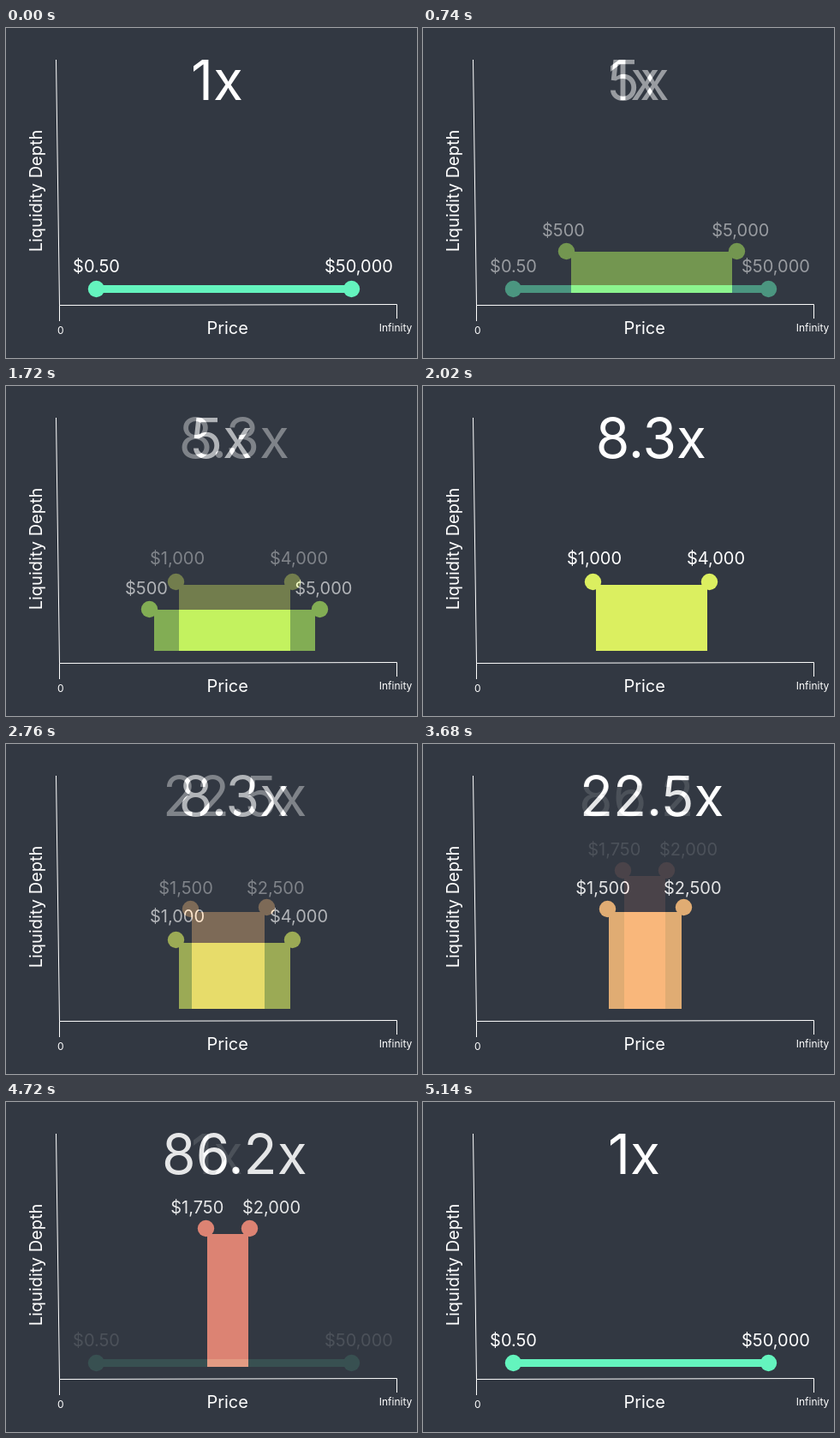
These frames come from a looping animation (480 px wide and 385 px high, 5200 ms). An HTML page:

```html
<!DOCTYPE html>
<html lang="en">
<head>
<meta charset="utf-8">
<title>Liquidity depth by price range</title>
<style>
  html, body { margin: 0; width: 100%; height: 100%; overflow: hidden; background: #323842; }
  svg { display: block; width: 480px; height: 385px; }
  text {
    font-family: Inter, Roboto, sans-serif;
    font-size: 20px;
    font-optical-sizing: none;
    text-anchor: middle;
    fill: #fff;
  }
  .small { font-size: 12px; }
  .big { font-size: 64px; }
  .axis { fill: none; stroke: #fff; stroke-width: 1; }
  #stages { isolation: isolate; }
  #stages g { mix-blend-mode: plus-lighter; }
</style>
</head>
<body>
<svg viewBox="0 0 480 385">
  <path class="axis" d="M58.5 37L62.5 323.5V342M62.5 323.5L456.5 322.5V339"/>
  <text transform="translate(42 190) rotate(-90)">Liquidity Depth</text>
  <text x="258.7" y="357">Price</text>
  <text class="small" x="63.9" y="357">0</text>
  <text class="small" x="455" y="354">Infinity</text>
  <g id="stages"></g>
</svg>
<script>
const BASE = 309;
const HOLD = 560, PERIOD = 1040, STEP = 60, STEPS = 8;

// title: [text, x]; ends: [label, label x, dot x, dot y]; bar: [left, right, top]
const stages = [
  { color: '#64f4be', title: ['1x', 246.5], bar: [114, 395, 300], labelY: 285,
    ends: [['$0.50', 105.5, 105.5, 304.5], ['$50,000', 412, 403.5, 304.5]] },
  { color: '#b4f45e', title: ['5x', 251.5], bar: [173, 361, 261], labelY: 243,
    ends: [['$500', 164, 167.5, 260.5], ['$5,000', 370.8, 366.5, 260.5]] },
  { color: '#dbef60', title: ['8.3x', 266.3], bar: [202, 332, 232], labelY: 208,
    ends: [['$1,000', 200, 198.5, 228.5], ['$4,000', 342, 334.5, 228.5]] },
  { color: '#fabd7a', title: ['22.5x', 267.2], bar: [217, 302, 196], labelY: 175,
    ends: [['$1,500', 210, 215.5, 192.5], ['$2,500', 314.7, 304.5, 190.5]] },
  { color: '#f58e7a', title: ['86.2x', 266.8], bar: [235, 283, 154], labelY: 130,
    ends: [['$1,750', 223.3, 233.5, 147.5], ['$2,000', 310, 284.5, 147.5]] }
];

function add(parent, tag, attrs, text = '') {
  const el = document.createElementNS('http://www.w3.org/2000/svg', tag);
  for (const key in attrs) el.setAttribute(key, attrs[key]);
  el.textContent = text;
  return parent.appendChild(el);
}

const root = document.getElementById('stages');
const layers = stages.map(({ color, title, bar, labelY, ends }) => {
  const g = add(root, 'g', { fill: color });
  const [left, right, top] = bar;
  add(g, 'rect', { x: left, y: top, width: right - left, height: BASE - top });
  for (const [label, x, cx, cy] of ends) {
    add(g, 'circle', { cx, cy, r: 9.7 });
    add(g, 'text', { x, y: labelY }, label);
  }
  add(g, 'text', { class: 'big', x: title[1], y: 84 }, title[0]);
  return g;
});

function draw() {
  const count = layers.length;
  const t = performance.now() % (PERIOD * count);
  const from = Math.max(0, Math.floor((t - HOLD) / PERIOD));
  const step = Math.floor((t - HOLD - from * PERIOD) / STEP) + 1;
  const mix = Math.min(1, Math.max(0, step / STEPS));
  const to = (from + 1) % count;
  layers.forEach((g, i) => {
    const alpha = i === from ? 1 - mix : i === to ? mix : 0;
    g.style.opacity = alpha;
    g.style.display = alpha ? '' : 'none';
  });
  requestAnimationFrame(draw);
}
draw();
</script>
</body>
</html>
```
